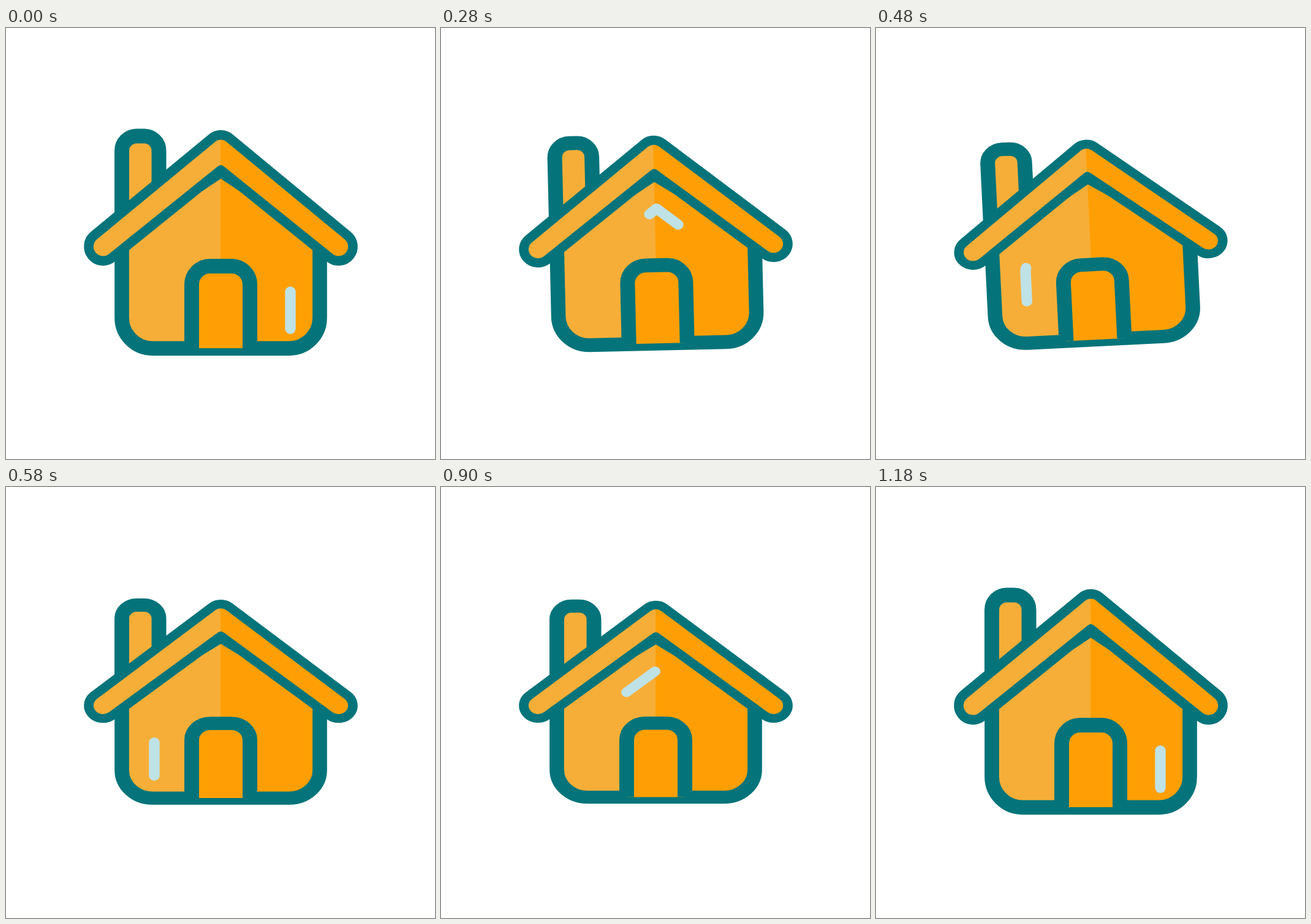
Recreate the animation shown at these times as an HTML page with a canvas. Size 700 px wide and 704 px high, loop 1200 ms.

```html
<!DOCTYPE html>
<html lang="en">
<head>
<meta charset="utf-8">
<title>House</title>
<style>
  html, body { margin: 0; width: 100%; height: 100%; overflow: hidden; background: #fff; }
  canvas { display: block; }
</style>
</head>
<body>
<canvas id="stage" width="700" height="704"></canvas>
<script>
const ctx = document.getElementById('stage').getContext('2d');
const LOOP = 1200, STEP = 20;
const TEAL = '#04747a', LIGHT = '#f7ae38', ORANGE = '#ff9f05', SHINE = '#bfe2e6';
const CX = 350.5, CY = 357, SPLIT = 350;

const smooth = x => x * x * (3 - 2 * x);

// Cubic Bezier easing with control points (x1, 0) and (x2, 1).
function bezier(x1, x2) {
  return x => {
    let lo = 0, hi = 1;
    for (let i = 0; i < 30; i++) {
      const t = (lo + hi) / 2, r = 1 - t;
      if (3 * x1 * t * r * r + 3 * x2 * t * t * r + t * t * t < x) lo = t; else hi = t;
    }
    return smooth(lo);
  };
}

// Each key is [time, value, easing towards this key].
function track(keys, t) {
  for (let i = 1; i < keys.length; i++) {
    const [t0, v0] = keys[i - 1], [t1, v1, ease = smooth] = keys[i];
    if (t <= t1) return v0 + (v1 - v0) * ease((t - t0) / (t1 - t0));
  }
  return keys[keys.length - 1][1];
}

const SQUASH = [[0, 1], [900, 0.9, bezier(0.33, 0.2)], [1180, 1]];
const TILT = [[0, 0], [115, 5], [395, -5], [580, 0]];
const SLIDE = [[0, 0], [580, 431.5], [680, 431.5], [1180, 0]];

// Upside-down U with rounded top corners.
function arch(left, right, top, bottom, r) {
  const p = new Path2D();
  p.moveTo(left, bottom);
  p.arcTo(left, top, right, top, r);
  p.arcTo(right, top, right, bottom, r);
  p.lineTo(right, bottom);
  return p;
}

function makeWall() {
  const p = new Path2D();
  p.moveTo(CX, 232);
  p.lineTo(189, 340);
  p.arcTo(189, 523.3, 300, 523.3, 50);
  p.arcTo(512, 523.3, 512, 400, 50);
  p.lineTo(512, 340);
  p.closePath();
  return p;
}

function makeRoof() {
  const p = new Path2D(), r = 23.3, a = Math.atan(0.815);
  const left = 158.3, right = 2 * CX - left;
  p.moveTo(CX, 232);
  p.arc(left, CY, r, Math.PI / 2 - a, Math.PI * 1.5 - a);
  p.arcTo(CX, 168, right, 327, 22);
  p.arc(right, CY, r, a - Math.PI / 2, a + Math.PI / 2);
  p.closePath();
  return p;
}

function makeShinePath() {
  const p = new Path2D();
  p.moveTo(464, 491);
  p.lineTo(464, 398);
  p.quadraticCurveTo(464, 382.3, 450, 370.9);
  p.lineTo(353, 291.9);
  p.lineTo(256, 370.9);
  p.quadraticCurveTo(242, 382.3, 242, 398);
  p.lineTo(242, 500);
  return p;
}

const chimney = arch(189, 249.5, 176.5, 308, 24);
const door = arch(303, 398, 389, 523, 30);
const wall = makeWall(), roof = makeRoof(), shinePath = makeShinePath();

function outline(path, width, color = TEAL) {
  ctx.lineWidth = width;
  ctx.strokeStyle = color;
  ctx.stroke(path);
}

function fill(path, color) {
  ctx.fillStyle = color;
  ctx.fill(path);
}

// Light left half, darker right half.
function fillHalves(path) {
  fill(path, LIGHT);
  ctx.save();
  ctx.beginPath();
  ctx.rect(SPLIT, 0, 400, 704);
  ctx.clip();
  fill(path, ORANGE);
  ctx.restore();
}

function drawShine(offset) {
  ctx.save();
  ctx.lineCap = 'round';
  ctx.setLineDash([60, 2000]);
  ctx.lineDashOffset = -offset;
  outline(shinePath, 17.4, SHINE);
  ctx.restore();
}

function draw(t) {
  ctx.setTransform(1, 0, 0, 1, 0, 0);
  ctx.fillStyle = '#fff';
  ctx.fillRect(0, 0, 700, 704);
  ctx.lineJoin = 'round';
  ctx.translate(CX, CY);
  ctx.rotate(track(TILT, t) * Math.PI / 180);
  ctx.scale(1, track(SQUASH, t));
  ctx.translate(-CX, -CY);

  fill(chimney, LIGHT);
  outline(chimney, 24);
  fillHalves(wall);
  outline(wall, 23.7);
  fill(door, ORANGE);
  outline(door, 24);
  drawShine(track(SLIDE, t));
  fillHalves(roof);
  outline(roof, 15.7);
}

const start = performance.now();
function tick() {
  const t = (performance.now() - start) % LOOP;
  draw(Math.floor(t / STEP) * STEP);
  requestAnimationFrame(tick);
}
tick();
</script>
</body>
</html>
```
